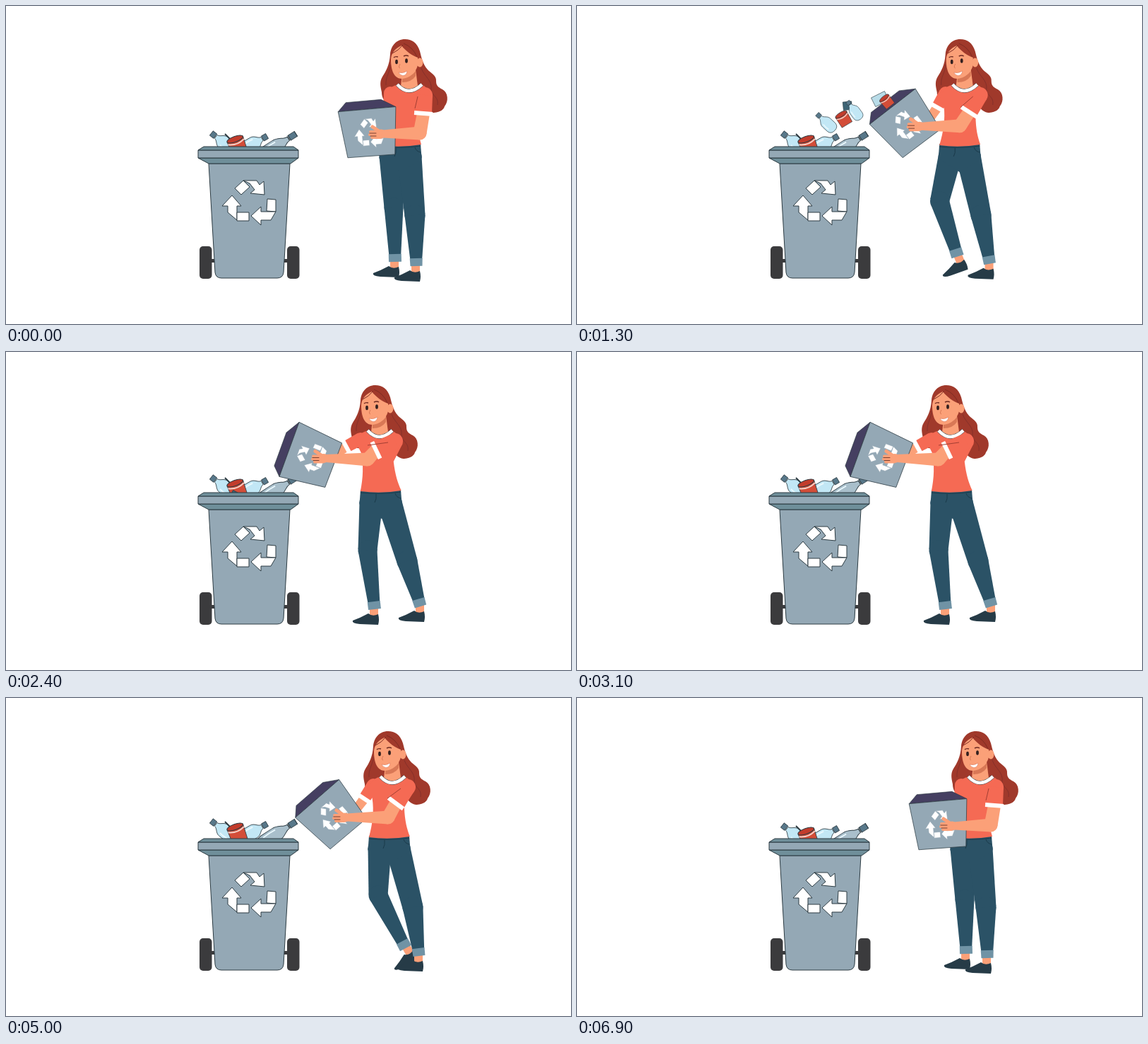
Write an HTML page with a canvas that moves like this. It is 800x450 px and loops after 7000 ms.

```html
<!DOCTYPE html>
<html lang="en">
<head>
<meta charset="utf-8">
<title>Recycling</title>
<style>
html, body { margin: 0; width: 100%; height: 100%; overflow: hidden; background: #fff; }
canvas { display: block; }
</style>
</head>
<body>
<canvas id="stage" width="800" height="450"></canvas>
<script>
const ctx = document.getElementById('stage').getContext('2d');
const LOOP = 7000, STEP = 100;
const SKIN = '#fba078', SHIRT = '#f56a54', HAIR = '#a0392b', JEANS = '#2b5266', CUFF = '#7093a5',
  SHOE = '#263b47', STEEL = '#94a8b5', TEAL = '#6f8f9a', LINE = '#2c3b42', GLASS = '#c2e7f5';

// Poses: standing, stepping, tipping, pouring, returning, settling
const keyTimes = [0, 800, 1800, 2300, 4000, 5000, 6100, 6500, 7000];
const keyPoses = [0, 1, 2, 3, 3, 4, 5, 0, 0];
const tracks = {
  chest: [0, -11, -34, -42, -24, -6],
  waist: [0, -9, -24, -28, -16, -5],
  boxX: [514, 490, 446, 433, 463, 501],
  boxY: [180, 176.5, 159, 149.5, 168, 179],
  boxTurn: [-5, -21, -56, -70, -41, -13],
  sleeveX: [591, 573, 537, 524, 552, 581],
  sleeveY: [152, 152, 146, 139, 149, 152],
  elbowX: [586, 564, 522, 512, 541, 574],
  elbowY: [180, 177, 160, 152, 169, 180],
  kneeLX: [549, 513, 514, 512, 527, 542],
  kneeLY: [285, 272, 280, 280, 279, 285],
  ankleLX: [551, 559, 519, 522, 566, 545],
  ankleLY: [362, 345, 364, 364, 354, 362],
  footTurn: [0, -43, 0, 0, -30, 0],
  kneeRX: [579, 577, 568, 568, 576, 578],
  ankleRX: [581, 583, 586, 587, 585, 582],
  ankleRY: [368, 367, 362, 360, 365, 367],
  bob: [0, 0, 0, -3, -6, -4]
};

const clamp = v => Math.max(0, Math.min(1, v));
const smooth = v => (v = clamp(v), v * v * (3 - 2 * v));
const mix = (a, b, p) => a + (b - a) * p;
const rad = deg => deg * Math.PI / 180;

// Monotone cubic through the keyed poses
function sample(values, t) {
  const y = i => values[keyPoses[i]];
  const slope = i => i < 0 || i > keyTimes.length - 2 ? 0 : (y(i + 1) - y(i)) / (keyTimes[i + 1] - keyTimes[i]);
  const tangent = i => {
    const a = slope(i - 1), b = slope(i);
    return a * b > 0 ? 2 * a * b / (a + b) : 0;
  };
  let i = 0;
  while (t >= keyTimes[i + 1]) i++;
  const span = keyTimes[i + 1] - keyTimes[i], s = (t - keyTimes[i]) / span, r = 1 - s;
  return y(i) * r * r * (1 + 2 * s) + y(i + 1) * s * s * (3 - 2 * s) +
    span * s * r * (tangent(i) * r - tangent(i + 1) * s);
}

function paint(d, fill, stroke, width = 1) {
  const path = new Path2D(d);
  if (fill) { ctx.fillStyle = fill; ctx.fill(path); }
  if (stroke) { ctx.strokeStyle = stroke; ctx.lineWidth = width; ctx.stroke(path); }
}

function oval(x, y, rx, ry, fill, stroke) {
  ctx.beginPath();
  ctx.ellipse(x, y, rx, ry, 0, 0, 7);
  ctx.fillStyle = fill;
  ctx.fill();
  if (stroke) { ctx.strokeStyle = stroke; ctx.lineWidth = 1; ctx.stroke(); }
}

function at(x, y, deg, draw) {
  ctx.save();
  ctx.translate(x, y);
  ctx.rotate(rad(deg));
  draw();
  ctx.restore();
}

// Flat-ended taper between two joints given as [x, y, radius]
function segment(color, a, b) {
  const len = Math.hypot(b[0] - a[0], b[1] - a[1]) || 1;
  const nx = (a[1] - b[1]) / len, ny = (b[0] - a[0]) / len;
  const side = (p, k) => `${p[0] + nx * p[2] * k} ${p[1] + ny * p[2] * k}`;
  paint(`M${side(a, 1)}L${side(b, 1)}L${side(b, -1)}L${side(a, -1)}Z`, color);
}

// Segments with round joints and a flat far end
function limb(color, ...joints) {
  joints.slice(1).forEach((b, i) => {
    const a = joints[i];
    oval(a[0], a[1], a[2], a[2], color);
    segment(color, a, b);
  });
}

// Point a given distance from b on the way towards a
function before(a, b, dist, r) {
  const k = dist / Math.hypot(a[0] - b[0], a[1] - b[1]);
  return [mix(b[0], a[0], k), mix(b[1], a[1], k), r];
}

function recycleSign(stroke, width) {
  const parts = [
    'M-21-20L-9-31L0-22L-12-11Z', 'M-9-31H10L14-25L20-30L21-11L1-13L7-18L0-27Z',
    'M-39 5L-25-10L-12 5H-18V25L-31 14V5Z', 'M-18 14H-1V26H-18Z',
    'M25-5L37-4V13L24 12Z', 'M24 13H37L30 25H16V32L2 19L16 6V13Z'
  ];
  parts.forEach(d => paint(d, '#fff', stroke, width));
}

function bottle(color = GLASS, stretch = 1) {
  ctx.save();
  ctx.scale(1, stretch);
  paint('M-3-10C-3-5-10-3-10 4V16Q-9 24 0 24Q9 24 10 16V4C10-3 3-5 3-10Z', color, LINE, .8);
  paint('M-6 2Q-7 8-6 15', null, '#e9f8fd', 2);
  paint('M-4-18H4V-11H-4Z', '#58788a', LINE, .8);
  ctx.restore();
}

function can() {
  paint('M-12-8L-11 14H11L12-8Z', '#d34d38', LINE, .8);
  paint('M-12-4Q0 2 12-4', null, '#f3d3ca', 2);
  oval(0, -8, 12, 4, '#c23c2c', LINE);
}

const carton = () => paint('M-15-10H15V10H-15Z', '#b9dce8', LINE, .8);
const lid = () => paint('M-8-7H8V8H-8Z', '#3d6475', LINE, .8);

// Rubbish that slides out of the box: shape, slot in box, release time, resting place and turn
const rubbish = [
  [can, -27, 1100, 323, 186, -22],
  [lid, -4, 1080, 325, 150, 28],
  [bottle, -17, 1000, 312, 184, -52],
  [bottle, -8, 1130, 318, 178, -34],
  [carton, 10, 1200, 358, 174, 13],
  [can, 2, 1280, 332, 165, -58]
];

function drawRubbish(p, t) {
  if (t > 2700) return;
  const sink = 68 * smooth((t - 1900) / 700);
  const a = rad(p.boxTurn);
  for (const [shape, slot, release, x, y, turn] of rubbish) {
    const depth = -14 - t * .022, fall = clamp((t - release) / 450);
    const fromX = p.boxX + slot * Math.cos(a) - depth * Math.sin(a);
    const fromY = p.boxY + slot * Math.sin(a) + depth * Math.cos(a);
    at(mix(fromX, x, fall), mix(fromY, y, fall * fall) + sink, mix(p.boxTurn, turn, fall), () => {
      const size = mix(.65, .9, fall);
      ctx.scale(size, size);
      shape();
    });
  }
}

function drawHeap(bob) {
  at(305, 191 + bob, -52, bottle);
  paint(`M310 ${181 + bob}l8 8`, null, LINE, 2);
  at(354, 193 + bob, 60, bottle);
  at(387, 196 + bob, 57, () => bottle('#a9bfcb', 1.55));
  at(327, 196 + bob, -20, can);
}

function drawBin() {
  for (const x of [274, 398]) {
    ctx.beginPath();
    ctx.roundRect(x, 340, 17.5, 46, 5);
    ctx.fillStyle = '#3b3b3d';
    ctx.fill();
  }
  paint('M290 358H298V363H290ZM391 358H399V363H391Z', '#3b3b3d');
  paint('M287 223H402L393 377Q392 385 384 385H305Q297 385 296 377Z', STEEL, LINE);
  paint('M272 215H414L403 223H287Z', TEAL, LINE);
  paint('M272 204H414V215H272Z', STEEL, LINE);
  paint('M272 204L280 199H407L414 204Z', TEAL, LINE);
  at(345, 278, 0, () => recycleSign(LINE, 1));
}

function shoe(x, y, turn) {
  at(x, y - 5, turn, () => {
    paint('M-7 2H5V14H-7Z', SKIN);
    paint('M-9 11Q-20 17-31 21Q-33 25-21 26L5 27Q7 20 5 12Q-3 16-9 11Z', SHOE);
  });
}

function leg(hip, knee, ankle, turn) {
  shoe(ankle[0], ankle[1], turn);
  limb(JEANS, hip, knee, before(knee, ankle, 10, 8.5));
  segment(CUFF, before(knee, ankle, 11, 9), ankle);
}

function sleeve(shoulder, cuff) {
  const r = cuff[2] + 1;
  limb(SHIRT, shoulder, cuff);
  segment('#fff', before(shoulder, cuff, 3, r), before(shoulder, cuff, -3, r));
}

function drawHead() {
  paint('M561 96L559 113Q571 125 583 113L580 90Z', SKIN);
  paint('M561 102Q573 101 580 92V99Q574 108 561 108Z', '#d97856');
  oval(586, 80, 4.5, 6.5, SKIN);
  paint('M560 56C550 60 545 68 545 76C545 92 550 103 561 103C571 102 580 95 583 84V73C575 70 566 64 560 56Z', SKIN);
  paint('M563 53Q576 58 582 72M562 55Q556 63 547 67', null, '#7f2c23');
  oval(553, 79, 1.9, 3.3, '#33201f');
  oval(567, 77.5, 1.9, 3.3, '#33201f');
  paint('M549 73Q551 71 555 72M563 71Q567 69 570 71', null, '#6d2a22', 1.4);
  paint('M558 82Q555 87 558 88', null, '#d97856');
  paint('M556 94Q562 96 568 92Q567 98.5 562 98.5Q558 98 556 94Z', '#fff', '#c85c45', .4);
}

function drawHair() {
  paint('M565 47C552 47 545 57 544 68C543 84 538 92 533 100C528 108 531 116 532 122C532 130 536 138 545 136L580 120L590 140C596 150 603 151 606 151C616 150 620 146 621 142C627 135 626 122 618 118C612 115 609 113 609 106C610 98 600 94 597 90C590 82 588 72 586 64C582 52 575 47 565 47Z', HAIR);
  paint('M544 83C544 94 537 100 538 112M588 88C592 100 604 105 602 118C603 128 613 128 611 140', null, '#86302a');
}

function drawWoman(p) {
  const { chest, waist } = p;
  at(chest, 0, 0, drawHair);

  const reachX = p.sleeveX - 593 - chest, reachY = p.sleeveY - 126;
  const backCuff = [544 + chest + reachX * .75, 123 + reachY * .85, 8.5];
  limb(SKIN, [backCuff[0], backCuff[1], 7], [p.boxX + 25, p.boxY, 6]);
  sleeve([544 + chest, 123, 9], backCuff);

  leg([545 + waist, 213, 16.5], [p.kneeLX, p.kneeLY, 13.5], [p.ankleLX, p.ankleLY, 9], p.footTurn);
  leg([571 + waist, 213, 17.5], [p.kneeRX, 296, 14.5], [p.ankleRX, p.ankleRY, 8.5], 0);
  at(waist, 0, 0, () => {
    paint('M530 195H587L588.5 215L560 236L528.5 215Z', JEANS);
    paint('M530 199Q558 202 587 198M552 201Q553 208 550 213M579 200Q581 206 587 207', null, '#1b3a4a');
  });

  const shear = (waist - chest) / 83;
  ctx.save();
  ctx.transform(1, 0, shear, 1, chest - shear * 115, 0);
  paint('M553 112C547 113 540 117 536 130L540 142C541 160 537 178 530 197Q558 201 588 196C585 185 583 175 584 155L601 130C600 119 595 114 588 111Q572 125 553 112Z', SHIRT);
  ctx.restore();
  at(chest, 0, 0, () => {
    drawHead();
    paint('M554 111Q570 129 589 111', null, LINE, 5.5);
    paint('M554 111Q570 129 589 111', null, '#fff', 4.5);
  });
}

function drawFrontArm(p) {
  const cuff = [p.sleeveX, p.sleeveY, 12], shoulder = [593 + p.chest, 126, 11];
  limb(SKIN, [cuff[0], cuff[1], 9], [p.elbowX, p.elbowY, 9.5], [p.boxX + 20, p.boxY + 1, 5.5]);
  sleeve(shoulder, cuff);
  paint(`M${shoulder[0] - 10} ${shoulder[1] + 2}L${cuff[0] - 12} ${cuff[1] - 7}`, null, '#a33f33');
  at(p.boxX, p.boxY, 0, () => {
    ctx.lineCap = 'round';
    oval(17, 1, 7, 6.5, SKIN);
    paint('M5-9L17-1', null, SKIN, 5);
    paint('M2-2H16M1 2H16M4 6H16', null, SKIN, 4);
    paint('M1 0H10M2 4H10', null, '#6d3527', .9);
    ctx.lineCap = 'butt';
  });
}

function draw(t) {
  const p = {};
  for (const name in tracks) p[name] = sample(tracks[name], t);
  const inBox = part => at(p.boxX, p.boxY, p.boxTurn, part);

  ctx.fillStyle = '#fff';
  ctx.fillRect(0, 0, 800, 450);
  drawWoman(p);
  inBox(() => paint('M-41-34L-29-46H21L41-34Z', '#453f61', LINE, .6));
  drawHeap(p.bob);
  drawRubbish(p, t);
  drawBin();
  inBox(() => {
    paint('M-41-34H41L34 33L-33 32Z', STEEL, LINE, .7);
    ctx.scale(.54, .67);
    recycleSign(STEEL, 1);
  });
  drawFrontArm(p);
}

function tick() {
  draw(Math.floor(performance.now() % LOOP / STEP) * STEP);
  requestAnimationFrame(tick);
}
tick();
</script>
</body>
</html>
```
